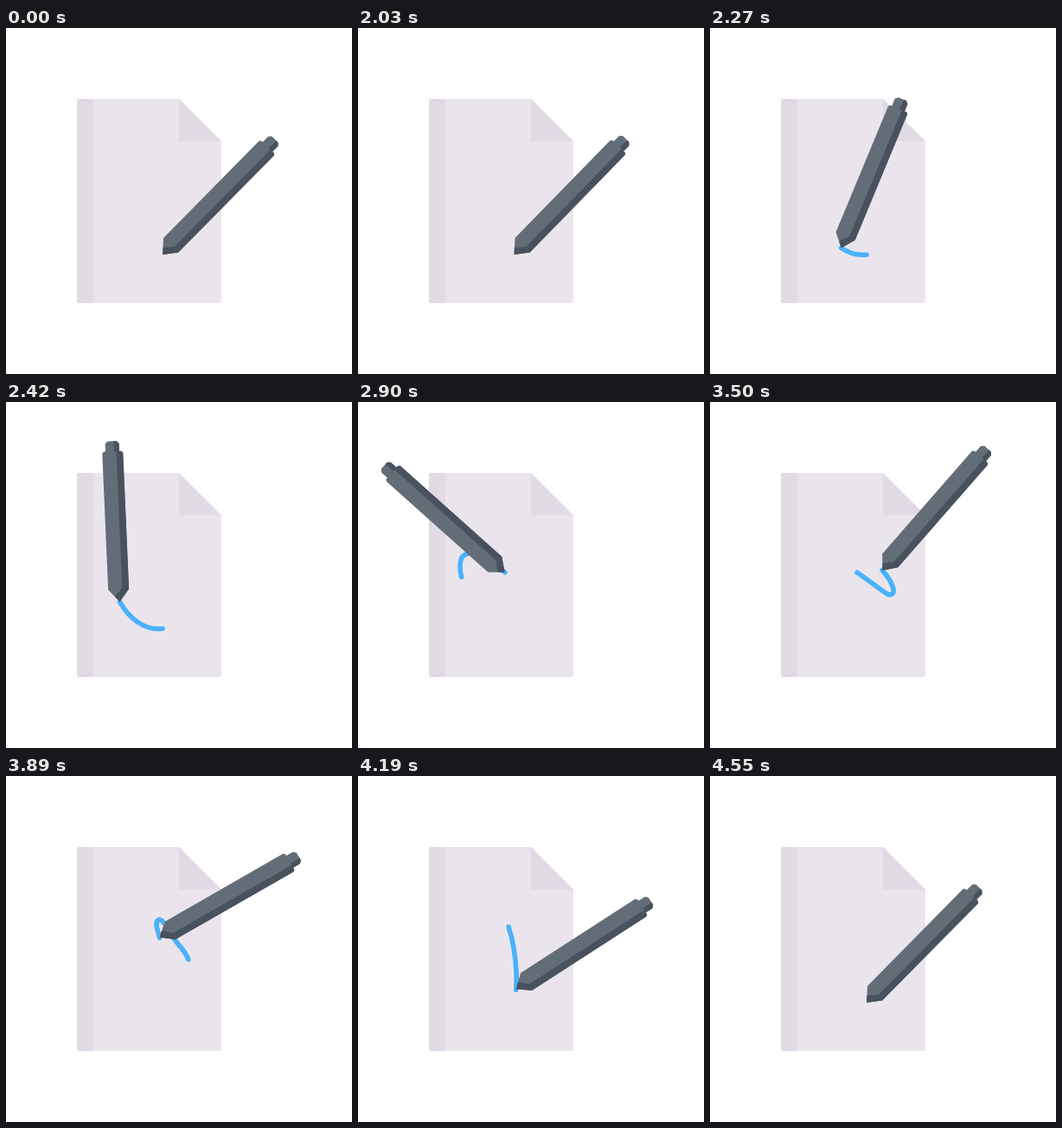
An HTML page for the animation above (4640 ms loop, 400 by 400 pixels).

```html
<!DOCTYPE html>
<html lang="en">
<head>
<meta charset="utf-8">
<title>Writing pen</title>
<style>
  html, body { margin: 0; width: 100%; height: 100%; overflow: hidden; background: #fff; }
  svg { display: block; width: 100%; height: 100%; }
</style>
</head>
<body>
<svg viewBox="0 0 400 400">
  <path fill="#eae5ec" d="M85 82H200L249 131V315a3 3 0 0 1-3 3H85a3 3 0 0 1-3-3V85a3 3 0 0 1 3-3Z"/>
  <path fill="#e1dae5" d="M101 82V318H85a3 3 0 0 1-3-3V85a3 3 0 0 1 3-3ZM200 82L249 131H200Z"/>
  <path id="ink" fill="none" stroke="#4ab1fb" stroke-width="5.6" stroke-linecap="round" d="
    M181 262 C160 264.5 141 250 130 228 C123 214 118 202 118 190
    C118 180 122 174.5 130 175 C140 176 152 186 170 197 L202 220
    C208.5 225 213 223 212 216 C210 208 205 201 199.5 195
    C193 187 187 175 181 168 C177 164 174 167 174 172
    C174 177 176 180 177.5 186 C181 202 184 225 183 243 C182.5 250 182 256 181 262"/>
  <g id="pen">
    <path fill="#626d77" d="M-9 -170V-183L-6 -186H4L7 -183V-170Z"/>
    <path fill="#48525e" d="M1 -170V-186H4L7 -183V-170Z"/>
    <path fill="#626d77" d="M0 0L-12.8 -14.5V-172L-11 -174H9.5L11.2 -172V-14.5Z"/>
    <path fill="#48525e" d="M0 0L-5.5 -6.2L3.5 -16V-174H9.5L11.2 -172V-14.5Z"/>
  </g>
</svg>
<script>
const LOOP = 4640, START = 2000, LENGTH = 2550, STEP = 30, TRAIL = 80.5;

// [ms, degrees]: the pen swings between these leans
const lean = [[0, 44.6], [840, -49.6], [1630, 47.5], [1980, 62.5], [LENGTH, 44.6]];
// [ms, distance along the stroke]
const travel = [[0, 0], [420, 62], [600, 126], [1500, 254], [1890, 313], [2160, 370], [LENGTH, 390]];

const ink = document.getElementById("ink");
const pen = document.getElementById("pen");
const clamp = (v, lo, hi) => Math.min(hi, Math.max(lo, v));

function span(keys, t) {
  const i = Math.max(1, keys.findIndex(k => t <= k[0]));
  const [ta, a] = keys[i - 1], [tb, b] = keys[i];
  return { i, a, b, d: tb - ta, u: (t - ta) / (tb - ta) };
}

// sine ease from key to key
function swing(keys, t) {
  const { a, b, u } = span(keys, t);
  return a + (b - a) * (1 - Math.cos(Math.PI * u)) / 2;
}

// one smooth curve through all keys, at rest at both ends
function glide(keys, t) {
  const { i, a, b, d, u } = span(keys, t), v = 1 - u;
  const speed = j => keys[j - 1] && keys[j + 1]
    ? (keys[j + 1][1] - keys[j - 1][1]) / (keys[j + 1][0] - keys[j - 1][0]) : 0;
  return a * v * v * (1 + 2 * u) + b * u * u * (1 + 2 * v)
    + d * u * v * (speed(i - 1) * v - speed(i) * u);
}

function draw(now) {
  const t = clamp(Math.floor((now % LOOP - START) / STEP) * STEP, 0, LENGTH);
  const head = glide(travel, t);
  const tip = ink.getPointAtLength(head);
  pen.setAttribute("transform", `translate(${tip.x} ${tip.y}) rotate(${swing(lean, t)})`);

  // the ink follows at a fixed length, then runs into the tip at the end
  const catchUp = clamp((t - 2160) / 360, 0, 1);
  const tail = Math.max(0, head - TRAIL * (1 - catchUp));
  ink.style.visibility = head - tail > 4 ? "visible" : "hidden";
  ink.style.strokeDasharray = `${head - tail} 9999`;
  ink.style.strokeDashoffset = -tail;
}

const t0 = performance.now();
function tick() {
  draw(performance.now() - t0);
  requestAnimationFrame(tick);
}
tick();
</script>
</body>
</html>
```
